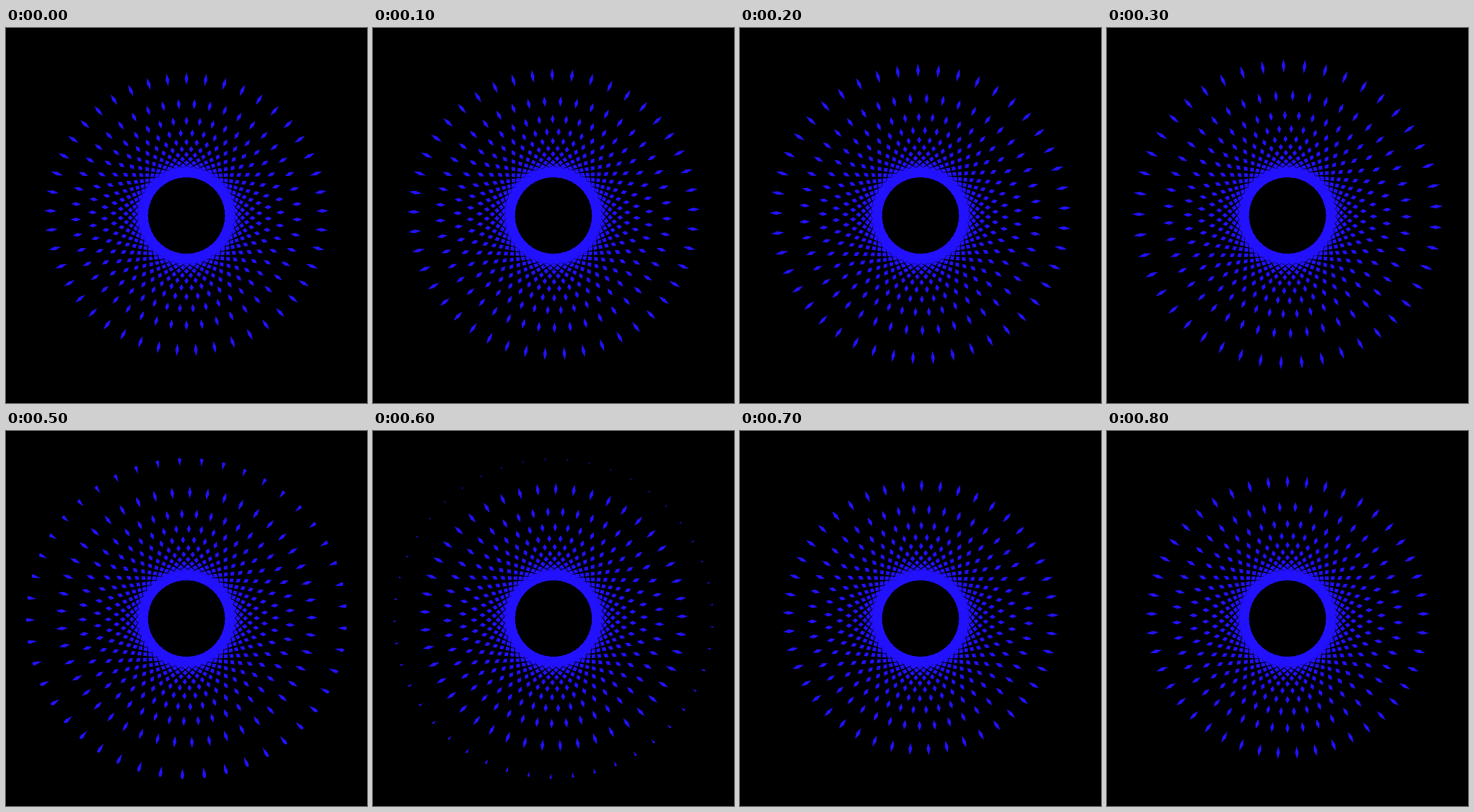
Animation of 500 by 520 pixels, one loop 0.9 s. Source, as an HTML page with a canvas:

```html
<!DOCTYPE html>
<html lang="en">
<head>
<meta charset="utf-8">
<title>Rotating rays</title>
<style>
  html, body { margin: 0; width: 100%; height: 100%; overflow: hidden; background: #000; }
  canvas { display: block; }
</style>
</head>
<body>
<canvas id="stage" width="500" height="520"></canvas>
<script>
const ctx = document.getElementById('stage').getContext('2d');
const RAYS = 45, HUB = 55, LENGTH = 215.6, WIDTH = 5;
const STEP_MS = 100, STEPS = 9;
const RAD = Math.PI / 180;

// Strokes rays tangent to the hub; turn is 1 for clockwise, -1 for counterclockwise.
function strokeRays(cx, cy, degrees, turn) {
  ctx.beginPath();
  for (let i = 0; i < RAYS; i++) {
    const angle = (degrees + i * 360 / RAYS) * RAD;
    const sin = Math.sin(angle), cos = Math.cos(angle);
    const x = cx + HUB * sin, y = cy - HUB * cos;
    ctx.moveTo(x, y);
    ctx.lineTo(x + turn * LENGTH * cos, y + turn * LENGTH * sin);
  }
  ctx.stroke();
}

function draw(step) {
  ctx.globalCompositeOperation = 'source-over';
  ctx.clearRect(0, 0, 500, 520);
  ctx.strokeStyle = '#2211ff';
  ctx.lineWidth = WIDTH;
  strokeRays(250.5, 260, 73, -1);
  // Only the overlap of both ray sets stays visible.
  ctx.globalCompositeOperation = 'source-in';
  strokeRays(249.5, 260, -73 - step, 1);
}

const start = performance.now();
let shown = -1;
function tick() {
  const step = Math.floor((performance.now() - start) / STEP_MS) % STEPS;
  if (step !== shown) draw(shown = step);
  requestAnimationFrame(tick);
}
tick();
</script>
</body>
</html>
```
